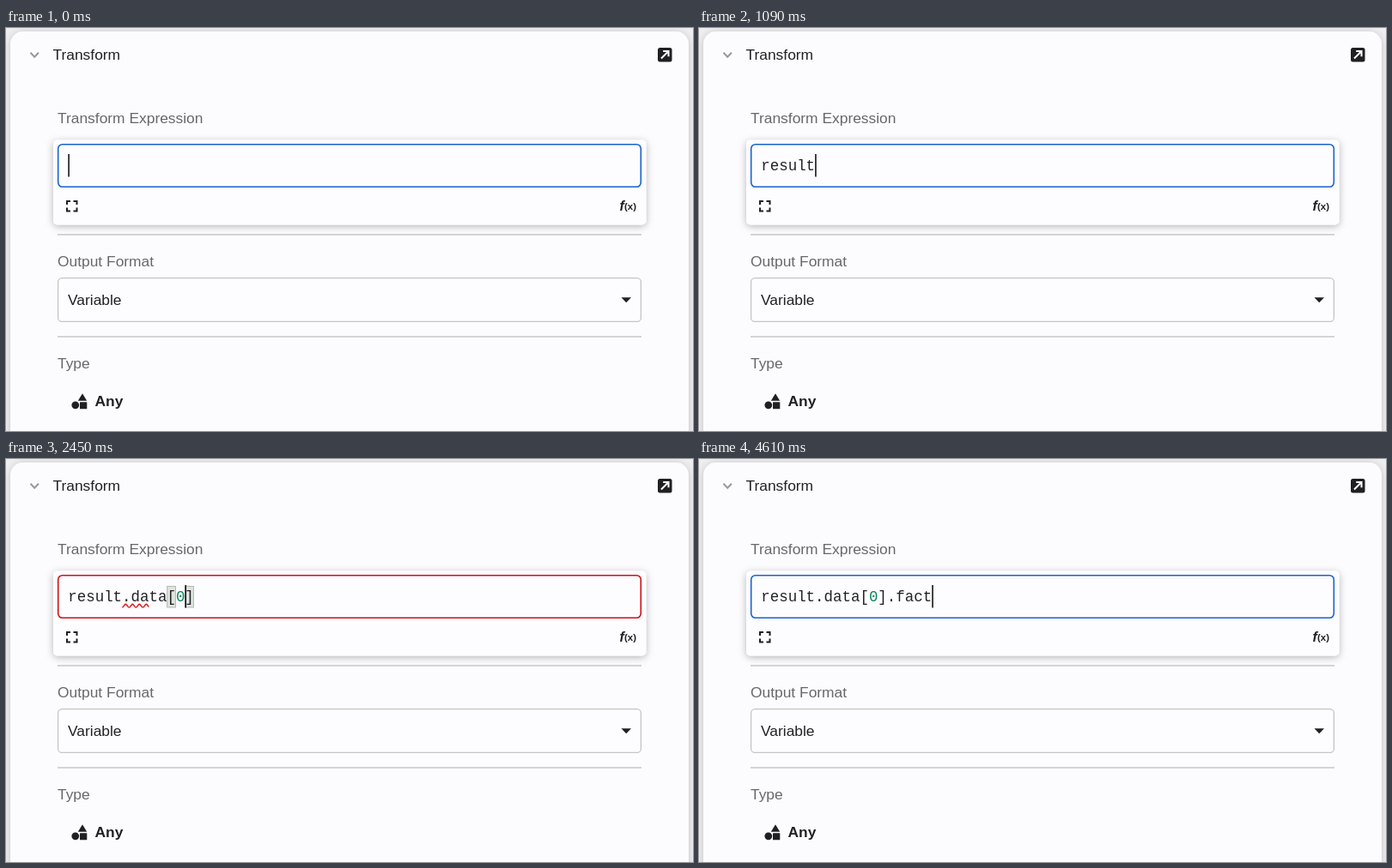
Write an HTML page that moves like this. It is 800 px wide and 470 px high and loops after 4640 ms.

```html
<!DOCTYPE html>
<html lang="en">
<head>
<meta charset="utf-8">
<title>Transform expression</title>
<style>
  html, body { margin: 0; width: 100%; height: 100%; overflow: hidden; background: #efeef1; }
  svg { display: block; width: 800px; height: 470px; }
  text { font: 17.4px "Liberation Sans", Arial, Helvetica, sans-serif; fill: #222225; }
  .label { fill: #68676b; }
  .bold, .hit { font-weight: bold; }
  .code { font: 17.45px "Liberation Mono", "Courier New", monospace; }
  .digit { fill: #0b8457; }
  .hit { fill: #0052b6; }
  .on { fill: #fff; }
  .on .hit { fill: #a5d3ff; }
  .rule { stroke: #c7c6ca; stroke-width: 1.5; }
</style>
</head>
<body>
<svg viewBox="0 0 800 470">
  <defs>
    <filter id="cardShadow" x="-5%" y="-5%" width="110%" height="110%">
      <feDropShadow dx="0" dy="1" stdDeviation="4" flood-color="#000" flood-opacity=".2"/>
    </filter>
    <filter id="panelShadow" x="-5%" y="-20%" width="110%" height="150%">
      <feDropShadow dx="0" dy="2" stdDeviation="4.5" flood-color="#000" flood-opacity=".28"/>
    </filter>
  </defs>
  <rect x="5" y="4" width="790" height="520" rx="15" fill="#fcfbfe" filter="url(#cardShadow)"/>

  <path d="M28.5 28.8l4.7 4.9 4.7-4.9" fill="none" stroke="#99989c" stroke-width="2"/>
  <text x="54.5" y="37.3">Transform</text>
  <rect x="759" y="23" width="16.5" height="16.5" rx="2.5" fill="#202023"/>
  <path d="M763 35.5l8-8M765.2 27h6.3v6.3" fill="none" stroke="#fff" stroke-width="2"/>

  <text class="label" x="60" y="111.3">Transform Expression</text>
  <path class="rule" d="M60 241H740M60 360H740"/>
  <text class="label" x="60" y="278">Output Format</text>
  <rect x="60.6" y="291.6" width="678.8" height="50.8" rx="4.5" fill="#fdfcff" stroke="#c5c4c8" stroke-width="1.3"/>
  <text x="72" y="323.2">Variable</text>
  <path d="M716.5 314.3h11.5l-5.75 6z" fill="#202023"/>
  <text class="label" x="60" y="397">Type</text>
  <g fill="#202023">
    <circle cx="80.8" cy="439.8" r="4.4"/>
    <path d="M89 426.3l5.2 8.4H83.8z"/>
    <rect x="86" y="436.2" width="8.3" height="8.1" rx=".6"/>
  </g>
  <text class="bold" x="103.5" y="441.3">Any</text>

  <rect x="55" y="130.5" width="690.5" height="99" rx="5" fill="#fdfcff" filter="url(#panelShadow)"/>
  <rect id="field" x="60.7" y="135.7" width="678.6" height="49.6" rx="5" fill="#fdfcff" stroke-width="1.6"/>
  <path d="M71 206v-4h4M78.500 202h4v4M82.500 209.500v4h-4M75 213.500h-4v-4" fill="none" stroke="#202023" stroke-width="2"/>
  <text class="bold" x="714.5" y="212.500" style="font-size:16px;font-style:italic">f</text>
  <text class="bold" x="720" y="212" style="font-size:11.5px">(x)</text>
  <g id="editor"></g>
</svg>
<script>
const LOOP = 4640, X0 = 73, CHAR = 10.47, ROW = 26, TOP = 174.5, WIDTH = 586;
const field = document.getElementById('field');
const editor = document.getElementById('editor');

const KINDS = {
  v: ['#fb3f70', ''], f: ['#fb3f70', 'f(x)'], t: ['#1764df', 'T'],
  n: ['#27ce82', '#'], l: ['#8a55dd', '[]']
};
const parse = s => s.split(' ').map(w => ({ kind: w[0], name: w.slice(2) }));
const names = parse('v:result v:request f:RIGHT f:ROUND f:REPLACE f:REVERSE v:rawResult f:RANDOM');
const namesRe = parse('v:result v:request f:REPLACE f:REVERSE v:rawResult');
const namesRes = parse('v:result v:request f:REVERSE v:rawResult');
const pageKeys = parse('n:current_page l:data t:first_page_url n:from n:last_page t:last_page_url ' +
  'l:links t:next_page_url t:path n:per_page t:prev_page_url n:to');
const dataKey = parse('l:data');
const itemKeys = parse('t:fact n:length');

// Editing steps: when, text, then optional hints, query, caret and bracket marks
const steps = [
  { at: 0, text: '' },
  { at: 180, text: 'r', hints: names, query: 'r' },
  { at: 270, text: 're', hints: namesRe, query: 're' },
  { at: 360, text: 'res', hints: namesRes, query: 'res' },
  { at: 700, text: 'result' },
  { at: 1180, text: 'result.', hints: pageKeys, query: '' },
  { at: 1300, text: 'result.d', hints: dataKey, query: 'd' },
  { at: 1420, text: 'result.da', hints: dataKey, query: 'da' },
  { at: 1880, text: 'result.data' },
  { at: 2120, text: 'result.data[]', caret: 12, marks: [11, 12] },
  { at: 2360, text: 'result.data[0]', caret: 13, marks: [11, 13] },
  { at: 2600, text: 'result.data[0]', marks: [11, 13] },
  { at: 2880, text: 'result.data[0].', hints: itemKeys, query: '', marks: [11, 13] },
  { at: 3420, text: 'result.data[0].fact' }
];
// Error underlines: from, to, first column, length
const errors = [[1270, 1560, 6, 1], [1560, 2540, 6, 3], [3000, 4450, 14, 1]];
// Border: time and share of red
const border = [[0, 0], [480, 0], [600, 1], [900, 1], [1050, 0], [1180, 0], [1330, 1],
  [2540, 1], [2700, 0], [2879, 0], [2880, .87], [2940, 1], [4450, 1], [4600, 0], [LOOP, 0]];

function redAt(t) {
  const i = border.findIndex(k => k[0] > t);
  const [t0, a] = border[i - 1], [t1, b] = border[i];
  return a + (b - a) * (t - t0) / (t1 - t0);
}

function mix(p) {
  const blue = [24, 99, 205], red = [204, 16, 22];
  return `rgb(${blue.map((c, i) => Math.round(c + (red[i] - c) * p))})`;
}

// Marks the matched letters: a whole run if there is one, else letter by letter
function highlight(name, query) {
  const low = name.toLowerCase(), run = low.indexOf(query);
  let q = 0;
  return [...name].map((c, i) => {
    const hit = run >= 0 ? i >= run && i < run + query.length : low[i] === query[q];
    if (hit) q++;
    return hit ? `<tspan class="hit">${c}</tspan>` : c;
  }).join('');
}

function icon(kind, x, y) {
  const [color, sign] = KINDS[kind];
  const box = `<rect x="${x}" y="${y}" width="22" height="21.5" rx="2.5" fill="${color}"/>`;
  if (!sign) {
    return box + `<path transform="translate(${x + 11} ${y + 10.5})" fill="none" stroke="#fff" stroke-width="1.7"
      stroke-linejoin="round" d="M0-7L6.500-4V3.500L0 7-6.500 3.500V-4zM-6.500-4L0-.8 6.500-4M0-.8V7"/>`;
  }
  const style = kind === 'f' ? 'font-size:11.5px;font-weight:bold;font-style:italic'
    : kind === 't' ? 'font:17px "Liberation Mono",monospace' : 'font-size:17px';
  return box + `<text x="${x + 11}" y="${y + (kind === 'f' ? 14.500 : 15.8)}" text-anchor="middle" class="on" style='${style}'>${sign}</text>`;
}

function popup({ hints, query }, x) {
  const left = Math.round(x) + .5;
  let out = `<rect x="${left}" y="${TOP}" width="${WIDTH}" height="${hints.length * ROW + 1}" fill="#fff" stroke="#b9b8bc"/>` +
    `<rect x="${left + .5}" y="175" width="${WIDTH - 1}" height="${ROW}" fill="#0052b6"/>`;
  hints.forEach(({ kind, name }, i) => {
    const y = 175 + i * ROW;
    out += icon(kind, left + 3.5, y + 2) +
      `<text class="code${i ? '' : ' on'}" x="${left + 36.3}" y="${y + 18.3}">${highlight(name, query)}</text>`;
  });
  return out;
}

function squiggle(col, len) {
  const x = X0 - .5 + col * CHAR;
  let d = '';
  for (let dx = 0; dx <= len * CHAR; dx += .5) {
    d += `${d ? 'L' : 'M'}${x + dx} ${(171.2 + 1.8 * Math.cos(dx * Math.PI / 4)).toFixed(2)}`;
  }
  return `<path d="${d}" fill="none" stroke="#e01b1b" stroke-width="1.5"/>`;
}

function drawEditor(step, error, caretOn) {
  const marks = (step.marks || []).map(c =>
    `<rect x="${X0 + c * CHAR - .5}" y="148.5" width="9.8" height="24.5" fill="#dfe4df" stroke="#b4b8b4"/>`).join('');
  const text = step.text.replace('0', '<tspan class="digit">0</tspan>');
  const x = X0 + (step.caret ?? step.text.length) * CHAR;
  editor.innerHTML = marks +
    `<text class="code" x="${X0 - .7}" y="166">${text}</text>` +
    (error ? squiggle(error[2], error[3]) : '') +
    (caretOn ? `<rect x="${x - .7}" y="147" width="1.6" height="26.5" fill="#151517"/>` : '') +
    (step.hints ? popup(step, x) : '');
}

let shown = '';
function render(t) {
  const step = steps.findLast(s => s.at <= t);
  const error = errors.find(e => t >= e[0] && t < e[1]);
  const caretOn = step.text.length < 19 || t < 3970 || t >= 4500;
  field.setAttribute('stroke', mix(redAt(t)));
  const key = [step.at, error, caretOn].join();
  if (key !== shown) drawEditor(step, error, caretOn);
  shown = key;
}

const start = performance.now();
function tick() {
  render((performance.now() - start) % LOOP);
  requestAnimationFrame(tick);
}
tick();
</script>
</body>
</html>
```
